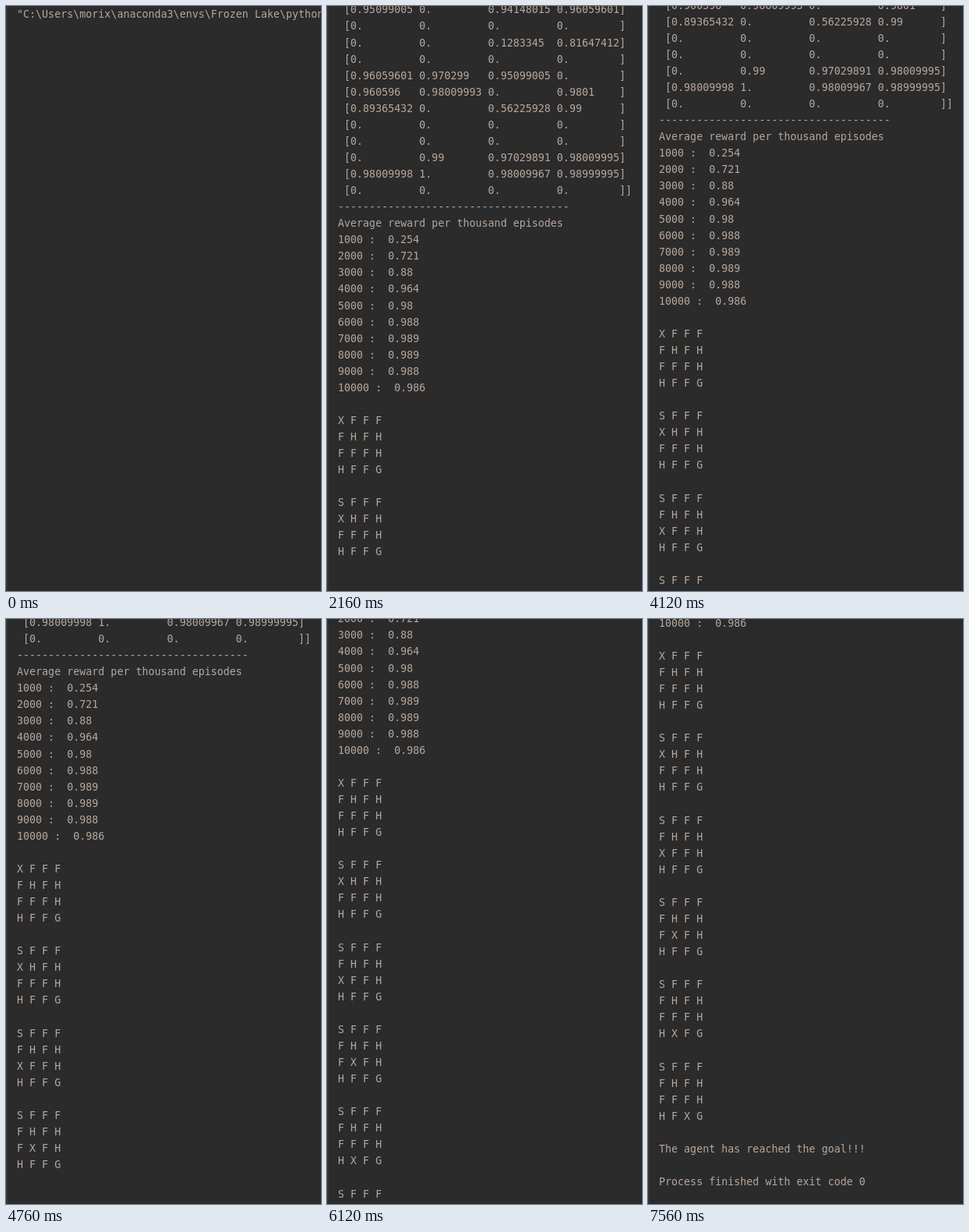
These frames come from a looping animation (404x750 px, 8 s). An HTML page:

```html
<!DOCTYPE html>
<html lang="en">
<head>
<meta charset="utf-8">
<title>Console run</title>
<style>
  html, body { margin: 0; width: 100%; height: 100%; overflow: hidden; background: #2b2b2b; }
  body { position: relative; box-sizing: border-box; border-left: 2px solid #353637; }
  pre {
    position: absolute; left: 12px; top: 0; margin: 0;
    font: 13.34px/21.07px "DejaVu Sans Mono", "Noto Sans Mono", monospace;
    font-variant-ligatures: none;
    color: #b6a799;
  }
</style>
</head>
<body>
<pre id="log"></pre>
<script>
const LOOP = 8000, STEP = 40, LINE = 21.07, GLIDE = 200;
const FIRST_PRINT = 1080, FIRST_SCROLL = 26.5;

// Each later print appends text, then the view glides down by some lines.
const PRINTS = [[1960, 5], [2960, 5], [4080, 5], [5000, 5], [6080, 5], [7080, 3]];

const Q_ROWS = [
  '0.94148015 0.93206535 0.94148015 0.95099005',
  '0.94148015 0.92274468 0.93206535 0.',
  '0.93206535 0.81647412 0.92274469 0.9305124',
  '0.91351724 0. 0.6128295 0.',
  '0.95099005 0. 0.94148015 0.96059601',
  '',
  '0. 0. 0.1283345 0.81647412',
  '',
  '0.96059601 0.970299 0.95099005 0.',
  '0.960596 0.98009993 0. 0.9801',
  '0.89365432 0. 0.56225928 0.99',
  '',
  '',
  '0. 0.99 0.97029891 0.98009995',
  '0.98009998 1. 0.98009967 0.98999995',
  ''
];
const REWARDS = [0.254, 0.721, 0.88, 0.964, 0.98, 0.988, 0.989, 0.989, 0.988, 0.986];
const PATH = [[0, 0], [1, 0], [2, 0], [2, 1], [3, 1], [3, 2]];
const MAP = ['SFFF', 'FHFH', 'FFFH', 'HFFG'];

const tableRow = (row, i) => {
  const cells = (row || '0. 0. 0. 0.').split(' ').map(v => v.padEnd(10));
  return (i ? ' [' : '[[') + cells.join(' ') + (i === Q_ROWS.length - 1 ? ']]' : ']');
};

const board = ([r, c]) => '\n' + MAP.map((line, y) =>
  [...line].map((cell, x) => y === r && x === c ? 'X' : cell).join(' ')
).join('\n') + '\n';

const command = '"C:\\Users\\morix\\anaconda3\\envs\\Frozen Lake\\python.exe"\n';
const summary = [
  '-------------- Q-table --------------',
  ...Q_ROWS.map(tableRow),
  '-'.repeat(37),
  'Average reward per thousand episodes',
  ...REWARDS.map((r, i) => `${(i + 1) * 1000} :  ${r}`)
].join('\n') + '\n';

const chunks = [
  command,
  summary + board(PATH[0]),
  ...PATH.slice(1).map(board),
  '\nThe agent has reached the goal!!!\n\nProcess finished with exit code 0'
];

const ease = u => u < 0.5 ? (2 * u) ** 2.5 / 2 : 1 - (2 - 2 * u) ** 2.5 / 2;
const log = document.getElementById('log');
let shown = 0;

function draw(now) {
  const t = Math.floor(now % LOOP / STEP) * STEP;
  let count = 1, scroll = 0;
  if (t >= FIRST_PRINT) {
    count = 2;
    scroll = FIRST_SCROLL;
  }
  for (const [start, lines] of PRINTS) {
    if (t <= start) break;
    count++;
    scroll += lines * LINE * ease(Math.min(1, (t - start) / GLIDE));
  }
  if (count !== shown) {
    log.textContent = chunks.slice(0, count).join('');
    shown = count;
  }
  log.style.transform = `translateY(${Math.round(-scroll)}px)`;
}

const origin = performance.now();
function tick() {
  draw(performance.now() - origin);
  requestAnimationFrame(tick);
}
tick();
</script>
</body>
</html>
```
